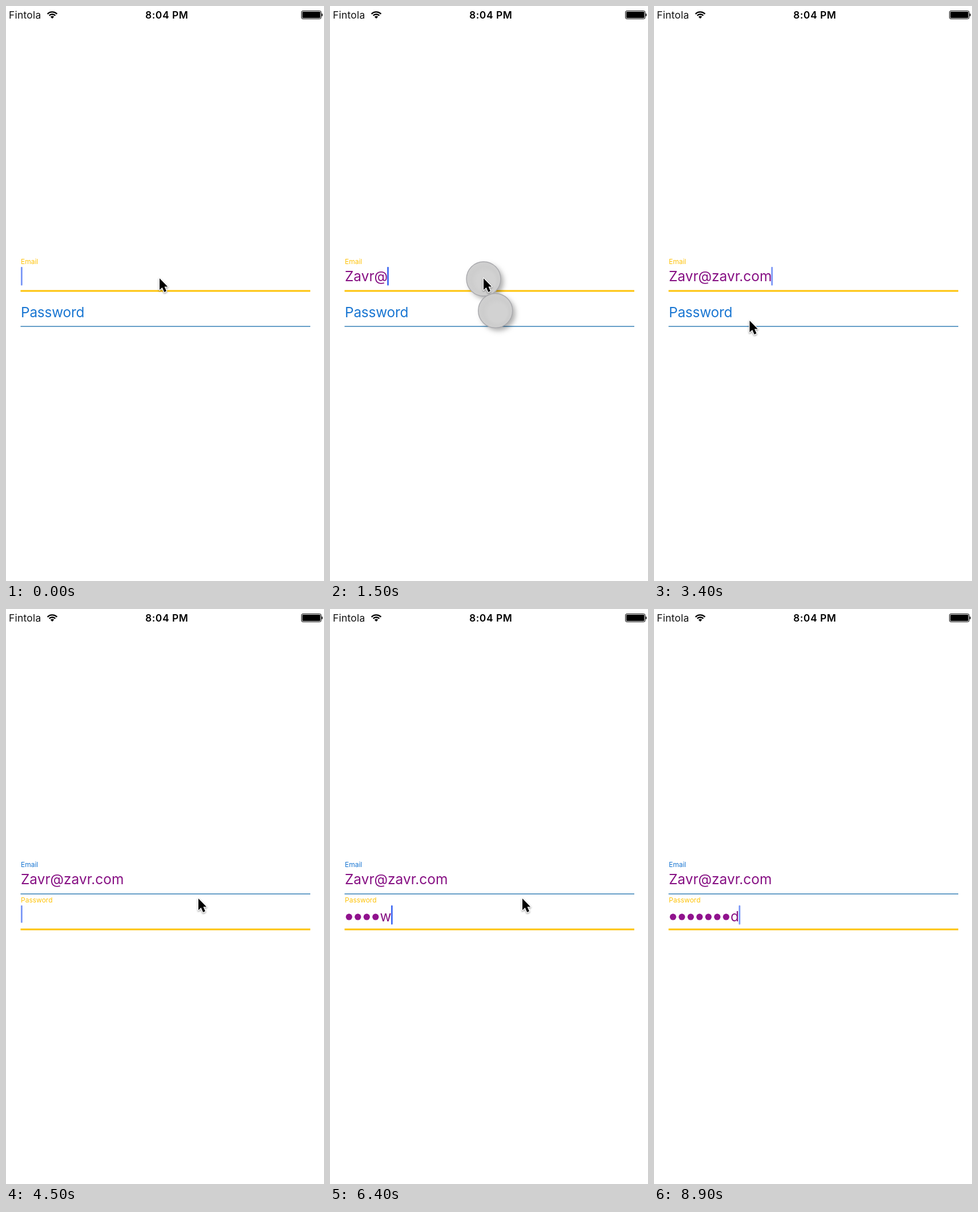
An HTML page with a canvas for the animation above (9 s loop, 557 px wide and 1005 px high).

```html
<!DOCTYPE html>
<html lang="en">
<head>
<meta charset="utf-8">
<title>Login form</title>
<style>
html, body { margin: 0; width: 100%; height: 100%; overflow: hidden; background: #fff; }
canvas { display: block; }
</style>
</head>
<body>
<canvas id="stage" width="557" height="1005"></canvas>
<script>
const ctx = document.getElementById('stage').getContext('2d');
const LOOP = 9000, STEP = 100;
const BLUE = '#1976d2', AMBER = '#fec30a', PURPLE = '#860f83', CARET = '#426bf2';
const LEFT = 26, RIGHT = 533;

const EMAIL = 'Zavr@zavr.com', EMAIL_KEYS = [600, 800, 1000, 1200, 1400, 1800, 2000, 2200, 2400, 2600, 2700, 2800, 2900];
const SECRET = 'password', SECRET_KEYS = [5400, 5500, 5800, 6000, 6300, 6500, 6800, 7000];
const FOCUS = 3500, SWITCH = 300;
const PATH = [[0, 269, 476], [3000, 269, 476], [3400, 167.5, 550], [3500, 171, 562], [3900, 337, 506],
  [7300, 337, 506], [7500, 341, 614], [7600, 341, 614], [7700, 347, 884]];

const mix = (a, b, p) => a + (b - a) * p;
const clamp = v => Math.min(1, Math.max(0, v));
const typed = (keys, t) => keys.filter(k => k <= t).length;

function text(str, x, y, size, color, weight = 400, spacing = 0, align = 'left') {
  ctx.font = `${weight} ${size}px Inter, Roboto, sans-serif`;
  ctx.letterSpacing = spacing + 'px';
  ctx.textAlign = align;
  ctx.fillStyle = color;
  ctx.fillText(str, x, y);
  return ctx.measureText(str).width;
}

function box(x, y, w, h, r, color) {
  ctx.fillStyle = color;
  ctx.beginPath();
  ctx.roundRect(x, y, w, h, r);
  ctx.fill();
}

function faded(alpha, draw) {
  ctx.globalAlpha = alpha;
  draw();
  ctx.globalAlpha = 1;
}

function statusBar() {
  text('Fintola', 5, 22, 17.4, '#111', 400, 0.25);
  text('8:04 PM', 281.7, 22, 17.4, '#000', 600, 0.55, 'center');

  ctx.strokeStyle = ctx.fillStyle = '#000';
  ctx.lineWidth = 2.4;
  for (const r of [7.3, 11.4]) {
    ctx.beginPath();
    ctx.arc(81, 21.8, r, -Math.PI * 0.76, -Math.PI * 0.24);
    ctx.stroke();
  }
  ctx.beginPath();
  ctx.moveTo(81, 22);
  ctx.arc(81, 21.8, 4.4, -Math.PI * 0.76, -Math.PI * 0.24);
  ctx.fill();

  ctx.lineWidth = 1;
  ctx.beginPath();
  ctx.roundRect(517.5, 8.5, 34.5, 14, 2.5);
  ctx.stroke();
  box(519, 10, 31.5, 11, 1.2, '#000');
  box(552.8, 13, 1.7, 5, [0, 1.5, 1.5, 0], '#000');
}

// Underline: thin blue at rest, thick amber with focus.
function underline(y, focus) {
  faded(1 - focus, () => box(LEFT - 0.5, y - 0.8, RIGHT - LEFT + 0.5, 1.6, 0, '#357fb6'));
  faded(focus, () => box(LEFT - 0.5, y - 1.6, RIGHT - LEFT + 0.5, 3.2, 0, AMBER));
}

function label(str, y, focus, size = 12, spacing = 0) {
  faded(1 - focus, () => text(str, LEFT, y, size, BLUE, 400, spacing));
  faded(focus, () => text(str, LEFT, y, size, AMBER, 400, spacing));
}

function caretAlpha(t, keys) {
  const recent = keys.some(k => k <= t && t - k < 400);
  if (recent) return 1;
  const phase = t % 1000;
  const [fade, on] = t < FOCUS ? [[0, 400], p => p > 0 && p < 400]
    : t < 7000 ? [[0, 500], p => p > 0 && p < 500]
    : [[400, 900], p => p < 400 || p > 900];
  return fade.includes(phase) ? 0.7 : on(phase) ? 1 : 0;
}

function caret(x, y, h, alpha) {
  faded(alpha, () => box(x, y, 2.8, h, 1, CARET));
}

function emailField(t, focus) {
  label('Email', 451, focus);
  underline(498, focus);
  const str = EMAIL.slice(0, typed(EMAIL_KEYS, t));
  const w = text(str, LEFT, 481, 24.4, PURPLE, 400, 0);
  if (t < FOCUS) caret(LEFT + w - (str ? 1 : 0), 456, 32.5, caretAlpha(t, EMAIL_KEYS));
}

function passwordField(t, focus) {
  label('Password', mix(544, 513, focus), focus, mix(24.4, 12, focus), mix(-0.2, 0, focus));
  underline(560, focus);
  if (t < FOCUS + 100) return;
  const n = typed(SECRET_KEYS, t);
  let x = LEFT;
  if (n) {
    ctx.fillStyle = '#90128d';
    for (let i = 0; i < n - 1; i++) {
      ctx.beginPath();
      ctx.arc(33.3 + i * 15.5, 538.2, 5.6, 0, Math.PI * 2);
      ctx.fill();
    }
    x += (n - 1) * 15.5;
    x += text(SECRET[n - 1], x - 0.5, 546, 24.4, PURPLE) - 1;
  }
  caret(x, 518, n ? 33.5 : 30.5, caretAlpha(t, SECRET_KEYS));
}

function touch(x, y) {
  ctx.save();
  ctx.shadowColor = 'rgba(0,0,0,.32)';
  ctx.shadowBlur = 8;
  ctx.shadowOffsetX = ctx.shadowOffsetY = 5;
  ctx.beginPath();
  ctx.arc(x, y, 30, 0, Math.PI * 2);
  ctx.fillStyle = '#cbcbcb';
  ctx.fill();
  ctx.restore();
  const shade = ctx.createRadialGradient(x + 4, y + 4, 16, x, y, 30);
  shade.addColorStop(0, '#d2d2d2');
  shade.addColorStop(0.5, '#cdcdcd');
  shade.addColorStop(1, '#cfcfcf');
  ctx.fillStyle = shade;
  ctx.fill();
  ctx.strokeStyle = '#a9a9ad';
  ctx.lineWidth = 1.4;
  ctx.stroke();
}

function pointer(t) {
  if (t > 7700) return;
  const i = Math.max(1, PATH.findIndex(k => k[0] >= t));
  const [a, b] = [PATH[i - 1], PATH[i]];
  const p = (t - a[0]) / (b[0] - a[0]);
  const arrow = new Path2D('M0 0V20.3L4.7 15.9L8.2 24L12 22.3L8.5 14.4H14.2Z');
  ctx.save();
  ctx.translate(mix(a[1], b[1], p), mix(a[2], b[2], p));
  ctx.lineJoin = 'round';
  ctx.lineWidth = 2.6;
  ctx.strokeStyle = '#fff';
  ctx.shadowColor = 'rgba(0,0,0,.4)';
  ctx.shadowBlur = 3;
  ctx.shadowOffsetY = 1.5;
  ctx.stroke(arrow);
  ctx.shadowColor = 'transparent';
  ctx.fillStyle = '#000';
  ctx.fill(arrow);
  ctx.restore();
}

function draw(t) {
  ctx.fillStyle = '#fff';
  ctx.fillRect(0, 0, 557, 1005);
  const p = clamp((t - FOCUS) / SWITCH), shift = p * p * (3 - 2 * p);
  statusBar();
  emailField(t, 1 - shift);
  passwordField(t, shift);
  if (t >= 1300 && t < 1700) {
    touch(269, 477);
    touch(289.7, 532.5);
  }
  pointer(t);
}

const start = performance.now();
function tick() {
  const t = (performance.now() - start) % LOOP;
  draw(Math.floor(t / STEP) * STEP);
  requestAnimationFrame(tick);
}
tick();
</script>
</body>
</html>
```
